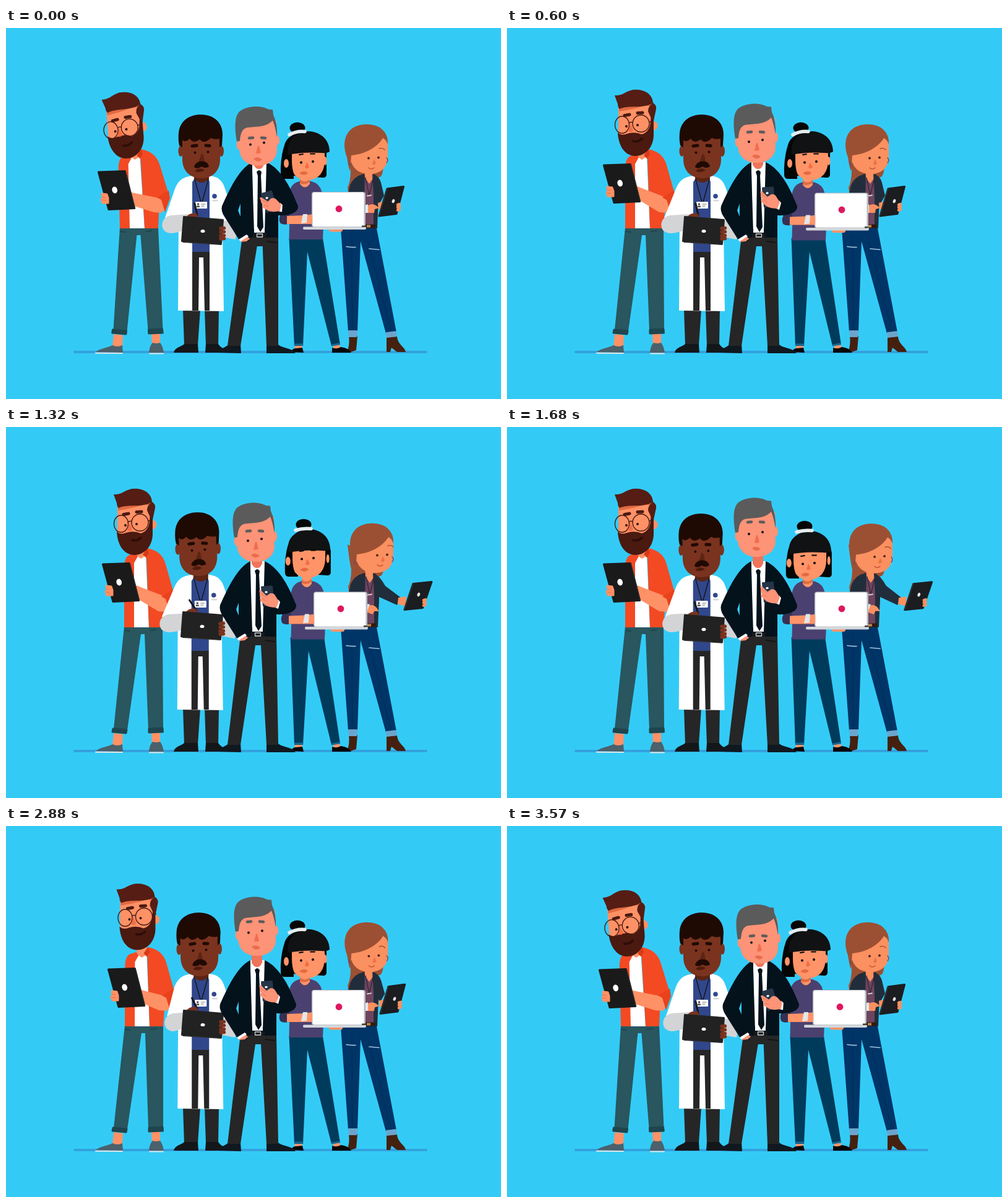
Write an HTML page with a canvas that moves like this. It is 800 px wide and 600 px high and loops after 3.6 s.

```html
<!DOCTYPE html>
<html lang="en">
<head>
<meta charset="utf-8">
<title>Team with devices</title>
<style>
html, body { margin: 0; width: 800px; height: 600px; overflow: hidden; background: #33cbf6; }
canvas { display: block; }
</style>
</head>
<body>
<canvas width="800" height="600"></canvas>
<script>
const g = document.querySelector('canvas').getContext('2d');
const LOOP = 3600;

const fill = (color, d) => { g.fillStyle = color; g.fill(new Path2D(d), 'evenodd'); };
const line = (color, width, d) => {
  g.strokeStyle = color; g.lineWidth = width; g.lineCap = g.lineJoin = 'round';
  g.stroke(new Path2D(d));
};
const oval = (color, x, y, rx, ry = rx, turn = 0) => {
  g.fillStyle = color; g.beginPath(); g.ellipse(x, y, rx, ry, turn, 0, 7); g.fill();
};
const box = (color, x, y, w, h, r = 0) => {
  g.fillStyle = color; g.beginPath(); g.roundRect(x, y, w, h, r); g.fill();
};
// Filled and outlined in one colour, for softly rounded corners.
const slab = (color, d) => { fill(color, d); line(color, 3, d); };

function group(x, y, turn, cx, cy, paint) {
  g.save();
  g.translate(x + cx, y + cy); g.rotate(turn); g.translate(-cx, -cy);
  paint();
  g.restore();
}
// Shifts by dx at height y1, fading to nothing at y0.
function lean(dx, y0, y1, paint) {
  const k = dx / (y1 - y0);
  g.save(); g.transform(1, 0, k, 1, -k * y0, 0);
  paint();
  g.restore();
}

const mix = (a, b, u) => a + (b - a) * u;
// Eased pose between keys of the form [time, pose].
function pose(t, keys) {
  const i = keys.findLastIndex(k => k[0] <= t);
  const [t0, a] = keys[i], [t1, b] = keys[i + 1] || [LOOP, a];
  const u = (t - t0) / (t1 - t0), e = u * u * (3 - 2 * u);
  return a.map((v, j) => mix(v, b[j], e));
}

function beardedMan(t) {
  // Hip shift, tablet shift, head shift and turn, gaze.
  const A = [-7, -7, 11, -15.5, 4, -.08, -1, 3], B = [0, 0, 0, 0, 0, 0, 0, 0], C = [1, 9, 10, 4.5, -6.5, 0, 2, -1.5];
  const [hip, tx, ty, hx, hy, turn, lx, ly] =
    pose(t, [[0, A], [100, A], [520, B], [1700, B], [2130, C], [2950, C], [3400, A]]);
  const skin = '#ff9166', hair = '#561d14', beard = '#4a1910', shirt = '#f34a23';

  fill(skin, 'M174 495L189 497L188 516H172ZM235 495H249L249 512H236Z');
  fill('#4b616b', 'M145 524C152 518 165 517 172 513Q180 517 188 513L189 525ZM231 525C232 516 234 512 237 509Q243 511 249 509C253 514 254 520 255 525Z');
  line('#dfe5e8', 2, 'M145 525.8L188 526M232 526.5H254');
  lean(hip, 500, 324, () => {
    fill('#29565f', 'M191 323H253L254 489H230L224 335H218L196 490L174 488Z');
    slab('#1f454e', 'M173 488L195 490L194 495L172 493ZM231 488L253 487L253.5 493L231 494Z');
    line('#1f454e', 2, 'M192 329L200 330M233 329L242 328');
  });

  lean(hip * 1.35, 640, 200, () =>
    fill(skin, 'M210 195H226V213L218 221L210 213Z'));
  group(hip, 0, 0, 0, 0, () => lean(hip * .4, 324, 200, () => {
    fill('#fff', 'M206 324V214L211 208L218 213L226 208L231 324Z');
    fill(shirt, 'M191 324V228Q191 211 199 207L209 204L213 209L207 220L207 324Z');
    fill(shirt, 'M228 196C244 199 254 207 258 222L271 268L270 279L256 280L253 324H231L227 212L222 206Z');
    fill('#d83a17', 'M228 196L231 204L226 211L221 206Z');
  }));
  fill(skin, `M${205 + tx} ${254 + ty}L${264 + hip} 277Q${268 + hip} 290 ${259 + hip} 299L${246 + hip} 298L${208 + tx} ${275 + ty}Z`);
  fill('#e9421d', `M${251 + hip} 274L${270 + hip} 263L${272 + hip} 275L${264 + hip} 298L${258 + hip} 278Z`);

  group(tx, ty, 0, 0, 0, () => {
    slab('#1a1a1a', 'M156.5 222L199 220.5L214.5 280.5L173 282.5Z');
    line('#2b2b2b', 1.5, 'M200 220L215.5 281');
    oval('#fff', 182.7, 251, 4.3, 5.5, -.25);
    slab(skin, 'M162 257L170 258L172 264L172 272L163 272L161 266L163 264Z');
    line('#ea7148', 1, 'M162 262L168 263M162 267L168 268');
  });

  group(hx, hy, turn, 208, 160, () => {
    oval(skin, 238.5, 158, 5, 7);
    fill(skin, 'M180 124H235V178Q230 198 208 198Q182 196 180 174Z');
    fill('#e26a42', 'M181 126H233V122Q210 131 181 135Z');
    fill(beard, 'M233 140L237 148L237 170C238 192 224 207 208 207C190 207 180 190 179 169Q185 175 194 171Q206 167 218 172Q231 168 232 151Z');
    fill(hair, 'M174 109C187 110 190 103 203 100C221 98 235 106 236 121Q242 125 241 131L237 150L233 146L228 135Q228 126 235 122C218 131 197 124 182 131Q179 128 179 123Z');
    group(lx, ly, 0, 0, 0, () => {
      fill('#f36e45', 'M200 154L196 167Q200 170 204 166Z');
      line('#4a1a11', 5, 'M190 141.5L198 140M211 137.5L219 137');
      oval('#31120c', 193, 159, 2); oval('#31120c', 211, 157, 2);
      g.strokeStyle = '#4a1a11'; g.lineWidth = 1.4;
      for (const [x, y, rx] of [[186, 156.5, 11.5], [216.5, 154.5, 13.5]]) {
        g.beginPath(); g.ellipse(x, y, rx, 13.8, 0, 0, 7); g.stroke();
      }
      line('#4a1a11', 1.4, 'M197 154Q200 151 203 153M230 152L236 150');
      line('#2c0d07', 3.5, 'M204 183Q212 185 218 179');
    });
  });
}

function doctor(t) {
  // Head shift, tablet shift, elbow shift.
  const rest = [0, 0, 0, 0, 0], elbowOut = [0, 0, 0, 0, -3], write = [-5, -2, -1, -6, -4], check = [-3, 0, 0, -7, 4];
  const [hx, hy, tx, ty, elbow] = pose(t, [[0, rest], [550, elbowOut], [1000, elbowOut], [1270, write], [1400, write],
    [1720, [-1, 0, 0, -1, -1]], [2220, [0, 0, 0, 0, -2]], [2520, [0, 0, 0, 0, -2]], [2800, check], [3000, check], [3350, rest], [LOOP, rest]]);
  const skin = '#7a331f', hair = '#1f0a03', pants = '#262626', shade = '#d3d4d6', lilt = hx * .25;

  fill(pants, 'M286 455H314L310 513H288ZM321 455H344L343 513H323Z');
  fill('#14171a', 'M271 525C273 516 283 516 288 511H310L311 525ZM322 525L323 511H343Q347 517 353 519V525Z');
  group(lilt, 0, 0, 0, 0, () => {
    fill('#fff', `M302 239C286 240 278 247 273 260L${257 + elbow} 307L279 310L278 457L352 458L350 330L371 340V310L354 260C350 247 344 241 330 239Z`);
    fill('#31478b', 'M301 249L305 243H327L329 249V363H301Z');
    fill(pants, 'M301 362H329V457H321L319 371H312L311 457H301Z');
    fill('#5c2412', 'M304 232H328V244Q316 256 304 244Z');
    line('#121212', 1.3, 'M305 245L315 281M327 245L317 281');
    box('#fff', 306, 281, 19, 11, 1);
    oval('#555', 310.5, 285, 1.8); box('#555', 308, 287.5, 5, 2.5);
    line('#777', 1, 'M316 285H322M316 288H320');
    oval('#31478b', 337, 272, 3.8);
    oval('#d9dadd', 338, 279, 5, 1.5);
    fill(shade, 'M349 312H362L372 336L371 342L349 338Z');
  });
  fill(shade, `M${266 + elbow} 303C${252 + elbow} 306 ${249 + elbow} 320 ${256 + elbow} 328C${264 + elbow} 335 275 331 286 328L302 306L296 301Z`);
  group(tx, ty, 0, 0, 0, () => {
    line('#151515', 3, `M${305 + hx * 1.5} ${284 - hx * .4}L309 303`);
    fill(skin, 'M291 306Q297 298 308 300L312 308Z');
    slab('#222', 'M287.5 305.5L350.5 310.5L347.5 349L284.5 344.5Z');
    line('#303030', 1.2, 'M286 346.3L348 350.4');
    oval('#fff', 318, 328.5, 3.5, 2.6);
    for (const y of [324, 330, 336, 341]) line(skin, 5.5, `M347 ${y}L352.5 ${y - .5}`);
  });

  group(hx, hy, hx * .004, 316, 200, () => {
    oval(skin, 282.5, 199, 4, 9); oval(skin, 348, 199, 4, 9);
    fill(skin, 'M285 165H346V212C346 232 333 243 316 243C298 243 285 232 285 212Z');
    fill(hair, 'M280 190Q278 181 279 170C281 150 296 140 315 140C337 140 350 154 350 172L349 190L345 193V179Q337 181 331 178Q320 189 313 180Q303 188 297 179Q289 186 285 181V193Z');
    line(hair, 5, 'M301 191L308 190M323 190L329 190.5');
    oval(hair, 305.5, 201.5, 2); oval(hair, 326.5, 200.5, 2);
    fill('#5c2412', 'M316 203L311 217H321L319 206Z');
    fill(hair, 'M304 225C306 213 326 212 328 224Q322 228 316 224Q309 229 304 225Z');
    fill('#4f1b0d', 'M305 231Q313 224 321 230Q312 236 305 231Z');
  });
}

function suitedMan(t) {
  // Torso shift, head shift, gaze, brow lift, hand shift, hand turn.
  const A = [3, 4, 4.5, 0, 0, 5, 0, 7, -.2], B = [0, 0, 0, 0, 0, 0, 0, 0, 0],
    C = [0, 0, -8, 0, -3, -3.5, 0, -6.5, 0], D = [0, 2, -8, -1, -3.5, -2, 0, -6.5, 0];
  const [dx, hx, hy, lx, ly, brow, px, py, turn] =
    pose(t, [[0, A], [100, A], [530, B], [1330, B], [1660, C], [1800, C], [2200, D], [2980, D], [3420, A]]);
  const skin = '#fd9377', suit = '#04121c', pants = '#262626', hair = '#5b5b5b';

  fill('#101820', 'M343 525C348 516 356 517 360 511H379L380 526ZM421 512H440C446 518 462 517 468 526H421Z');
  lean(dx, 514, 339, () => {
    fill(pants, 'M379 337H437L440 514H421L412 353H403L379 514H358Z');
    line('#151515', 2, 'M419 345L434 347M379 345L389 344');
  });
  group(dx, 0, 0, 0, 0, () => {
    fill('#fff', 'M395 217H418V334H397Z');
    fill('#f0745a', 'M397 205H414V224Q406 232 397 224Z');
    fill('#fff', 'M394 217L404 231L396 239ZM417 216L408 231L415 238Z');
    fill(suit, 'M402 233Q406 227 410 233L409 239L413 322L408 330L403 321L404 239Z');
    fill(suit, 'M395 217C373 228 359 260 346 288Q344 296 350 305L374 343L388 337L389 333L437 339V303C454 304 470 299 469 288C459 263 444 229 418 217L415 331H398L395 235ZM376 284L372 295L376 305Z');
    fill(suit, 'M384 325H398V339H384ZM415 325H437V339H415Z');
    box('#17191b', 396, 332, 22, 7);
    g.strokeStyle = '#cfd4d8'; g.lineWidth = 1.3; g.strokeRect(402.5, 333, 9, 5);
    fill(skin, 'M375 344L387 337L391 341L386 345L377 346Z');
    fill('#fff', 'M373 342L386 334L389 337L376 345Z');
  });
  group(dx + px, py, turn, 424, 277, () => {
    slab('#263547', 'M413.5 259L429.5 258L432 286L416.5 289Z');
    oval('#fff', 420.5, 267, 2.2, 1.7);
    fill('#fff', 'M435 292L440 279L443 283L440 294Z');
    fill(skin, 'M410 268Q408 263 412 264L421 273L427 269Q433 268 436 274L441 282L437 292Q425 292 419 288L411 281Q409 277 413 277L410 273Z');
    line('#e87559', 1, 'M412 269L420 275M413 277L420 281');
  });

  group(hx, hy, 0, 0, 0, () => {
    oval(skin, 372.5, 184, 4, 8); oval(skin, 434, 177, 4, 8);
    fill(skin, 'M372 145H433L434 192C434 209 420 218 403 218C386 218 374 208 373 192Z');
    fill(hair, 'M369 179C366 160 364 139 374 130C388 120 410 121 420 127L427 127.5L428 136Q435 150 434 172Q431 154 427 145C414 158 397 154 384 157Q375 160 374 178Z');
    group(lx, ly, 0, 0, 0, () => {
      line('#5d5d5d', 4.6, `M389 ${168.5 + brow}L395 ${168 + brow}M409 ${168 + brow}L415 ${168.5 + brow}`);
      oval('#111', 391, 184, 2); oval('#111', 413, 181, 2);
      fill('#f16e4e', 'M403 186L400 198Q404 200 408 197L405 186Z');
      fill('#e96c4d', 'M396 207Q402 202 410 208Q404 215 396 207Z');
    });
  });
}

function laptopWoman(t) {
  // Torso shift, head shift, turn of the hair, gaze.
  const A = [0, 0, 0, 0, 0], B = [3, 4, 0, 0, 0], C = [3, 1, -2, 9, -2], D = [3, 1, 1, 9, 3], E = [3, 1, 0, 9, 0];
  const [dx, hx, hy, bun, ly] = pose(t, [[0, A], [100, A], [550, B], [900, B], [1250, C], [1400, C],
    [1680, D], [1850, D], [2200, E], [2480, E], [2820, A], [LOOP, A]]);
  const skin = '#ff9468', black = '#050606', top = '#4b4170', dy = dx * .5;

  fill(skin, 'M468 512H478L479 520H466ZM529 512H539L541 519H529Z');
  fill(black, 'M460 524Q464 517 469 518L479 517L481 525ZM527 517Q534 520 541 516Q553 517 558 525H527Z');
  lean(dx * .7, 514, 340, () => {
    fill('#003b5c', 'M457.5 340H512L540 512L526 514L487 362L480 514H466Z');
    line('#176b96', 3, 'M467 512H479M527 513L538.5 511');
  });
  group(dx, dy, 0, 0, 0, () => {
    fill(top, 'M474 248Q461 251 458 265L447 298L458 318L457.5 342H512L513 320L516 300L510 264Q507 252 494 248Z');
    fill(skin, 'M475 235H491V252Q483 263 475 252Z');
    fill('#de6b43', 'M475 245Q483 252 491 244V249Q483 255 475 251Z');
    fill('#363054', 'M447 296Q439 307 443 315Q447 319 456 317L458 300Z');
    fill(skin, 'M454 304L480 303L497 301V317L454 317Z');
    fill('#e3e6e9', 'M480 301H487L486 315L477 316Z');
  });

  group(hx, hy, 0, 0, 0, () => {
    oval(black, 471 + bun, 161.5 - bun * .2, 12.5, 9);
    group(bun * .65, 0, 0, 0, 0, () =>
      fill(black, 'M449 196C450 177 466 168 486 168L515 190L518 202V238Q517 242 513 242L465 239V244L449 244Q444 243 444 237Q443 214 449 192Z'));
    fill(skin, 'M462 193H515V214Q515 228 508 237Q500 246 487 246Q473 246 466 237Q462 229 462 214Z');
    oval(skin, 453 + bun * .2, 219, 4, 7); oval(skin, 516 + bun * .35, 215, 2.5, 7);
    fill('#111213', 'M456 205C453 180 470 167 489 167C511 168 523 183 523 200Q518 203 510 202Q480 200 456 205Z');
    line('#e4ecee', 5.5, `M${458 + bun} ${172.5 - bun * .4}Q${470 + bun} ${166 - bun * .1} ${483 + bun} ${167.5 - bun * .1}`);
    group(0, ly, 0, 0, 0, () => {
      line(black, 1.8, 'M474 205L480 204M492 203.5L499 203.5');
      oval(black, 477, 217.5, 2); oval(black, 496, 216, 2);
      fill('#f36e45', 'M486 217L483 226Q487 229 490 225Z');
      fill('#e56a42', 'M474 235Q481 229 488 234Q483 241 474 235Z');
    });
  });

  group(dx, dy, 0, 0, 0, () => {
    box(skin, 522, 322, 22, 7.5, 3);
    box('#b6bbc1', 494, 265, 87, 57, 4);
    box('#fff', 495.5, 266, 83, 55, 3);
    box('#d3d7db', 480, 321.5, 102, 4.5, 2);
    box('#3c3f44', 575, 319.5, 5, 2.5);
    oval('#de1760', 538, 292.5, 5.4);
    box(skin, 487, 303, 8, 13, 3);
  });
}

function tabletWoman(t) {
  // Reach, head shift, gaze.
  const A = [0, 0, 0, 0, 0], out = [1, 9, 0, 5, -3], ease = [.97, 6, .5, 2, -1], keep = [.91, 5.5, .5, 2, -1];
  const [k, hx, hy, lx, ly] = pose(t, [[0, A], [1000, A], [1330, out], [1420, out], [1700, ease],
    [2220, keep], [2580, keep], [2930, A], [LOOP, A]]);
  const skin = '#fb9060', hair = '#9c5033', jacket = '#222d3b', jeans = '#003567', boot = '#46200f';
  const at = (x0, y0, x1, y1) => `${mix(x0, x1, k)} ${mix(y0, y1, k)}`;

  fill(boot, 'M554 498H568L566 521L557 524H551Q556 513 554 498ZM615 500L632 499C633 512 645 516 646 524H632L623 517L621 524H615Z');
  fill(jeans, 'M541 324H599L631 492L614 494L573 345L568 491H553Z');
  line('#002c57', 1, 'M559 336L560 485M585 345L622 489');
  line('#9fc4e2', 1.7, 'M550 353.5Q557 355 565 354.5M587 357L603 358.5');
  fill('#6ba5cd', 'M553 489H568L567 500H554ZM614 492L631 490L632 499L615 501Z');

  group(k, 0, 0, 0, 0, () => {
    fill(hair, 'M551 190Q554 218 557 230Q557 248 552 258L554 272L572 255L606 240Q612 230 608 216Z');
    fill(jacket, 'M578 236Q562 240 556 254L551 275L560 324H600L603 250Q600 240 594 236Z');
    fill('#6d4560', 'M580 238H593Q598 262 597 321H578Z');
    fill(skin, 'M579 226H594V242L587 252L580 242Z');
    fill(jacket, 'M592 236L602 244L602 277L599 324L594 321V270Z');
    line('#332331', 1.2, 'M581 242L587 271L594 242');
    line('#d7cbd2', 2, 'M584 271.5L590 270.5');
    box('#301a12', 576, 317.5, 21, 6);
    box('#bd8a4c', 583, 318.5, 6, 4);
  });
  fill(jacket, `M593 236Q603 239 ${at(606, 250, 613, 257)}L${at(611, 271, 637, 275)}L${at(603, 285, 632, 288)}L599 273Z`);
  fill(skin, `M${at(601, 283, 634, 276)}L${at(613, 279, 647, 274)}L${at(610, 293, 646, 290)}L${at(602, 293, 633, 286)}Z`);
  group(0, k * 2, k * .35, 588, 293, () => {
    fill('#e3e6e9', 'M579 287L585 285L586 299H579Z');
    fill(skin, 'M585 287Q592 283 598 287L603 291L596 293L595 299H585Z');
  });
  slab('#1b1d20', `M${at(616, 260, 658, 253.5)}L${at(642.5, 256.5, 688, 250.5)}L${at(631, 300.5, 673.5, 292.5)}L${at(603, 304, 644, 295.5)}Z`);
  line('#34383c', 1.2, `M${at(616, 260, 658, 253.5)}L${at(603, 304, 644, 295.5)}`);
  oval('#e8e8e8', mix(626, 667, k), mix(280, 271, k), 2.2, 3.2, .35);
  group(k * 42, -k * 6, 0, 0, 0, () => {
    for (const y of [286, 290, 294.5]) line(skin, 4.5, `M633 ${y}L636 ${y - 1}`);
  });

  group(hx, hy, 0, 0, 0, () => {
    fill(skin, 'M556 185L600 168L617 185V208C617 227 604 236 588 236C570 236 557 226 557 208Z');
    oval(skin, 556, 211, 4, 7);
    fill(hair, 'M551 209C544 190 546 172 560 162C574 153 597 154 608 164Q618 173 617 188Q614 180 609 178C600 193 580 204 558 206L556 232Q553 224 551 209Z');
    line('#5d4a70', 1.3, 'M555 216Q553 220 556 222M615 210Q619 214 615 218');
    group(lx, ly, 0, 0, 0, () => {
      oval('#4a2415', 586, 210.5, 1.9); oval('#4a2415', 602, 209.5, 1.9);
      line(hair, 1.4, 'M603 195Q609 193 612 197');
      fill('#ec7147', 'M595 212L592 220Q595 223 598 219Z');
      line('#c9573a', 1.6, 'M586 226Q590 230 595 226');
    });
  });
}

function draw() {
  const t = performance.now() % LOOP;
  box('#33cbf6', 0, 0, 800, 600);
  box('#33a1de', 109, 522, 572, 4, 2);
  for (const person of [tabletWoman, beardedMan, doctor, laptopWoman, suitedMan]) person(t);
  requestAnimationFrame(draw);
}
draw();
</script>
</body>
</html>
```
